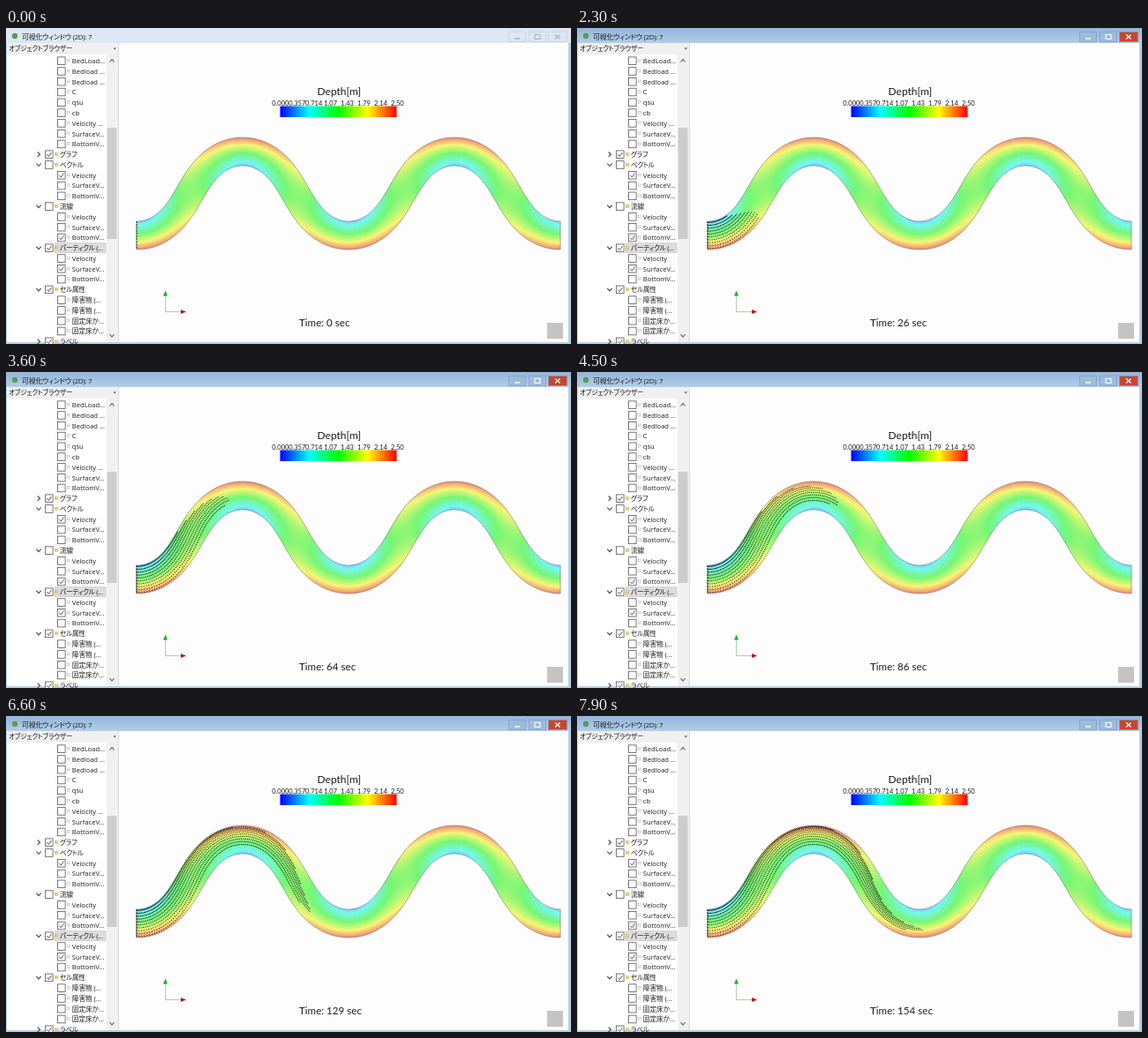
Write an HTML page with a canvas that moves like this. It is 640 px wide and 358 px high and loops after 8000 ms.

```html
<!DOCTYPE html>
<html lang="ja">
<head>
<meta charset="utf-8">
<title>可視化ウィンドウ</title>
<style>
html, body { margin: 0; width: 100%; height: 100%; overflow: hidden; background: #b3cde8; }
svg, canvas { position: absolute; left: 0; top: 0; width: 640px; height: 358px; }
text { fill: #1c1c1c; }
.ui { font: 7.7px "Open Sans", "Noto Sans CJK JP", "Noto Sans CJK", sans-serif; font-feature-settings: "palt"; }
.plot { font-family: Lato, sans-serif; }
</style>
</head>
<body>
<canvas id="view" width="640" height="358"></canvas>
<svg id="ui" viewBox="0 0 640 358"></svg>
<script>
const LOOP = 8000, ACTIVE_AT = 1000;
const CLOCK = [[0, 0], [1300, 0], [2300, 26], [3600, 64], [4500, 86], [5800, 114], [6600, 129], [7900, 154], [8000, 156]];
const WAVE = 322.6, LENGTH = 2 * WAVE, HALF = 16;
const svg = document.getElementById('ui');
const ctx = document.getElementById('view').getContext('2d');

function add(tag, attrs, text, parent = svg) {
  const el = document.createElementNS('http://www.w3.org/2000/svg', tag);
  for (const k in attrs) el.setAttribute(k, attrs[k]);
  if (text !== undefined) el.textContent = text;
  parent.append(el);
  return el;
}
const rect = (x, y, width, height, fill, more, parent) =>
  add('rect', { x, y, width, height, fill, ...more }, undefined, parent);
const line = (d, stroke, width = 1, parent) =>
  add('path', { d, stroke, 'stroke-width': width, fill: 'none' }, undefined, parent);
const label = (x, y, text, size = 7.7, more) =>
  add('text', { x, y, class: 'ui', style: `font-size:${size}px`, ...more }, text);
const defs = add('defs', {});
function gradient(id, colors, axis) {
  const g = add('linearGradient', { id, ...axis }, undefined, defs);
  colors.forEach((c, i) => add('stop', { offset: i / (colors.length - 1), 'stop-color': c }, undefined, g));
}

// Window frame and title bar
gradient('active', ['#92b6dc', '#b3cde8'], { x2: 0, y2: 1 });
const titleBar = rect(0, 0, 640, 17, '#dce7f3');
add('circle', { cx: 10, cy: 9, r: 3.2, fill: '#5f9a50' });
label(18, 12.8, '可視化ウィンドウ (2D): 7', 8, { 'letter-spacing': -.3 });

function windowButtons(fills, glyph, edge) {
  const g = add('g', {});
  [[569, 19], [592, 19], [614, 21]].forEach(([x, w], i) =>
    rect(x + .5, 4.5, w, 11, fills[i], { stroke: edge, 'stroke-width': .7 }, g));
  line('M576 12H582', glyph, 1.4, g);
  line('M599 7.5H605V12.5H599Z', glyph, 1.1, g);
  line('M622 7.5L627.5 12.5M627.5 7.5L622 12.5', glyph, 1.3, g);
  return g;
}
const idleButtons = windowButtons(['#dce7f3', '#dce7f3', '#dce7f3'], '#a9b5c2', '#c3d0de');
const liveButtons = windowButtons(['#9dbcdb', '#9dbcdb', '#c9452f'], '#fff', '#7f9dbd');

// Object browser
rect(1, 17, 126, 339, '#f0f0f0');
label(3, 26, 'オブジェクトブラウザー', 7.5, { 'letter-spacing': -.15 });
add('path', { d: 'M121.5 22.5h3.4l-1.7 2z', fill: '#555' });
rect(1, 30, 113, 326, '#fff');
rect(114.5, 113, 11, 126, '#cdcdcd');
line('M117.5 38.5L120 35.5L122.5 38.5M117.5 347L120 350L122.5 347', '#555', 1.1);
line('M127.5 17V356', '#dcdcdc');

// '>' closed group, 'v' open group, '+' ticked box
const velocity = ['Velocity', 'SurfaceV...', 'BottomV...'];
const ticked = n => velocity.map((t, i) => (i === n ? '+' : '') + t);
const rows = ['BedLoad...', 'Bedload ...', 'Bedload ...', 'C', 'qsu', 'cb', 'Velocity ...', ...velocity.slice(1),
  '>+グラフ', 'vベクトル', ...ticked(0), 'v流線', ...ticked(2), 'v+パーティクル (...', ...ticked(1),
  'v+セル属性', '障害物 (...', '障害物 (...', '固定床か...', '固定床か...', '>+ラベル'];

rows.forEach((row, i) => {
  const y = 37.2 + i * 11.78;
  const [, arrow, tick, name] = row.match(/^([>v]?)(\+?)(.*)$/);
  const x = arrow ? 44.5 : 58.5;
  if (i === 18) rect(55, y - 5.5, 58, 11, '#dcdcdc', { stroke: '#c0c0c0', 'stroke-width': .6 });
  if (arrow) line(arrow === 'v' ? `M34.3 ${y - 1.5}l2.7 3l2.7-3` : `M35.7 ${y - 2.7}l2.8 2.7l-2.8 2.7`, '#444', 1.1);
  rect(x, y - 4.3, 8.6, 8.6, '#fff', { stroke: '#555', 'stroke-width': .8 });
  if (tick) line(`M${x + 1.8} ${y}l2 2.3l3.2-4.5`, '#444', .9);
  if (arrow) rect(55.3, y - 1.6, 3.6, 3, '#f0d568', { stroke: '#c0a44a', 'stroke-width': .4 });
  else rect(69.3, y - 1.8, 2.8, 2.8, '#f2f6fb', { stroke: '#a3b4c8', 'stroke-width': .5 });
  label(arrow ? 61 : 74.8, y + 2.9, name, 7.6, { 'letter-spacing': arrow ? -.2 : 0 });
});

// Colour scale
gradient('scale', Array.from({ length: 25 }, (_, i) => `hsl(${240 - i * 10} 100% 50%)`));
rect(310.5, 88.5, 132, 12.5, 'url(#scale)');
const plotText = (x, y, size, text, anchor = 'middle') =>
  add('text', { x, y, class: 'plot', 'font-size': size, 'text-anchor': anchor }, text);
plotText(377.3, 76, 12, 'Depth[m]');
['0.000', '0.357', '0.714', '1.07', '1.43', '1.79', '2.14', '2.50'].forEach((t, i) =>
  plotText(310.8 + i * 18.93, 88, 7.5, t));

// Axes, corner mark and clock
line('M180.5 321.5V303', '#9fc79f', .8);
line('M180.5 321.5H199', '#c9a8a8', .8);
add('path', { d: 'M180.5 297.5l2.5 6h-5z', fill: '#1cb01c' });
add('path', { d: 'M204 321.5l-6-2.5v5z', fill: '#c01616' });
rect(613, 334, 18, 18, '#c4c4c4');
const clock = plotText(332, 338, 11.6, '', 'start');

// Meandering channel: heading swings 60 degrees either way along its length
const heading = s => Math.PI / 3 * Math.sin(2 * Math.PI * s / WAVE);
const path = [[148, 235]];
for (let s = 0; s <= LENGTH + 1; s++) {
  const [x, y] = path[s], a = heading(s + .5);
  path.push([x + Math.cos(a), y - Math.sin(a)]);
}
function at(s, n) {
  const i = Math.floor(s), f = s - i, a = heading(s), [x, y] = path[i];
  return [x + f * Math.cos(a) - n * Math.sin(a), y - f * Math.sin(a) - n * Math.cos(a)];
}
function trace(c, points) {
  c.beginPath();
  points.forEach(p => c.lineTo(...p));
}

const scene = document.createElement('canvas');
scene.width = 640;
scene.height = 358;
(function drawChannel(c) {
  c.fillStyle = '#fdfdfd';
  c.fillRect(128, 17, 509, 339);
  const ds = 2, dn = 1;
  for (let s = 0; s < LENGTH; s += ds) {
    const end = Math.min(s + ds + .6, LENGTH);
    const bend = Math.cos(2 * Math.PI * s / WAVE - .08);
    for (let n = -HALF; n < HALF; n += dn) {
      const k = (n + dn / 2) / HALF, top = Math.min(n + dn + .5, HALF);
      const depth = 1.36 - 1.02 * k * bend + .06 * k * k;
      const hue = Math.min(225, 240 * (1 - depth / 2.5));
      c.fillStyle = `hsl(${hue} 88% 71%)`;
      trace(c, [at(s, n), at(end, n), at(end, top), at(s, top)]);
      c.fill();
    }
  }
  const steps = Array.from({ length: 324 }, (_, i) => Math.min(i * 2, LENGTH));
  trace(c, [...steps.map(s => at(s, HALF)), ...steps.reverse().map(s => at(s, -HALF))]);
  c.closePath();
  c.strokeStyle = '#777';
  c.lineWidth = .6;
  c.stroke();
  c.setLineDash([2, 1.2]);
  trace(c, [at(0, HALF), at(0, -HALF)]);
  c.strokeStyle = '#222';
  c.lineWidth = 1;
  c.stroke();
})(scene.getContext('2d'));

// Tracers drift to the outer bank of each bend, crowding together there
const ease = u => { u = Math.max(0, Math.min(1, u)); return u * u * (3 - 2 * u); };
function lane(n0, s) {
  const crest = 15 - 20.5 * ((15 - n0) / 30) ** 1.5, trough = -15 + (crest + 15) * .6;
  return n0 + (crest - n0) * ease(2 * s / WAVE) + (trough - crest) * ease(2 * s / WAVE - 1);
}
function drawTracers(sec) {
  ctx.fillStyle = '#101010';
  for (let i = 0; i < 10; i++) {
    const n0 = -15 + i * 3.3, off = n0 + 11.7;
    const speed = off < 0 ? .95 : 1 - .45 * (off / 26.4) ** 2;
    for (let age = 0; age < sec; age++) {
      const s = speed * (2.4 * age - .0018 * age * age);
      const [x, y] = at(s, lane(n0, s));
      ctx.fillRect(x - .5, y - .5, 1, 1);
    }
  }
}

function seconds(t) {
  const i = CLOCK.findIndex(k => k[0] > t), [t0, v0] = CLOCK[i - 1], [t1, v1] = CLOCK[i];
  return Math.floor(v0 + (v1 - v0) * (t - t0) / (t1 - t0) + 1e-6);
}

function frame() {
  const t = Math.floor(performance.now() % LOOP / 100) * 100;
  const sec = seconds(t), active = t >= ACTIVE_AT;
  titleBar.setAttribute('fill', active ? 'url(#active)' : '#dce7f3');
  liveButtons.style.display = active ? '' : 'none';
  idleButtons.style.display = active ? 'none' : '';
  clock.textContent = `Time: ${sec} sec`;
  ctx.clearRect(0, 0, 640, 358);
  ctx.drawImage(scene, 0, 0);
  drawTracers(sec);
  requestAnimationFrame(frame);
}
frame();
</script>
</body>
</html>
```
